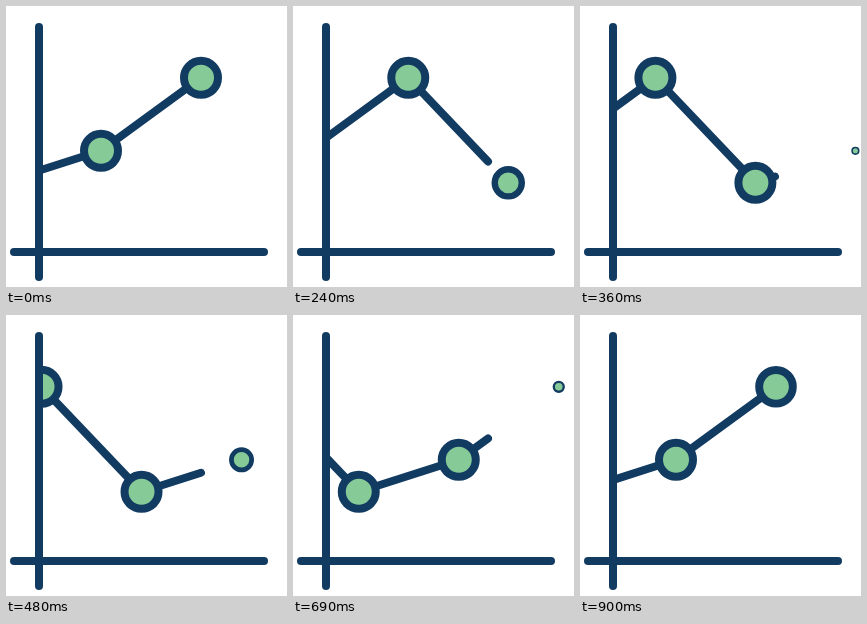
Animation of 281x281 px, one loop 0.93 s. Source, as an HTML page with a canvas:

```html
<!DOCTYPE html>
<html lang="en">
<head>
<meta charset="utf-8">
<title>Scrolling line chart</title>
<style>
  html, body { margin: 0; width: 100%; height: 100%; overflow: hidden; background: #fff; }
  canvas { display: block; width: 100vw; height: 100vh; }
</style>
</head>
<body>
<canvas id="stage"></canvas>
<script>
const SIZE = 281, LOOP = 930, STEP = 30;
const NAVY = '#123b62', GREEN = '#86cb97';
const LEVELS = [144.8, 71.8, 176.8];
const GAP = 100, START = 95, EDGE = 195, AXIS = 33;
const SPEED = 299 / 900; // px per ms

const canvas = document.getElementById('stage');
const ctx = canvas.getContext('2d');

function resize() {
  const ratio = window.devicePixelRatio || 1;
  canvas.width = Math.round(innerWidth * ratio);
  canvas.height = Math.round(innerHeight * ratio);
}

function stroke(points, width) {
  ctx.beginPath();
  points.forEach(([x, y]) => ctx.lineTo(x, y));
  ctx.lineWidth = width;
  ctx.stroke();
}

// The line grows out of the fixed right edge.
function trim(points) {
  const line = [];
  for (const [x, y] of points) {
    if (x > EDGE) {
      const [px, py] = line[line.length - 1];
      line.push([EDGE, py + (y - py) * (EDGE - px) / (x - px)]);
      break;
    }
    line.push([x, y]);
  }
  return line;
}

function dot([x, y]) {
  const scale = Math.min(1, (EDGE + GAP - x) / GAP);
  if (scale <= 0) return;
  ctx.beginPath();
  ctx.arc(x, y, 17 * scale, 0, Math.PI * 2);
  ctx.fillStyle = GREEN;
  ctx.fill();
  ctx.lineWidth = 8 * scale;
  ctx.stroke();
}

function draw(time) {
  const shift = time * SPEED;
  const points = [];
  for (let k = -1; k < 6; k++) {
    points.push([START + GAP * k - shift, LEVELS[(k + 3) % 3]]);
  }

  ctx.setTransform(canvas.width / SIZE, 0, 0, canvas.height / SIZE, 0, 0);
  ctx.fillStyle = '#fff';
  ctx.fillRect(0, 0, SIZE, SIZE);
  ctx.strokeStyle = NAVY;
  ctx.lineCap = ctx.lineJoin = 'round';

  ctx.save();
  ctx.beginPath();
  ctx.rect(AXIS, 0, SIZE - AXIS, SIZE);
  ctx.clip();
  stroke(trim(points), 8);
  points.forEach(dot);
  ctx.restore();

  stroke([[AXIS, 21], [AXIS, 271]], 8);
  stroke([[8, 246], [258, 246]], 8);
}

const begin = performance.now();
function tick() {
  const time = (performance.now() - begin) % LOOP;
  draw(Math.floor(time / STEP) * STEP);
  requestAnimationFrame(tick);
}

addEventListener('resize', resize);
resize();
tick();
</script>
</body>
</html>
```
